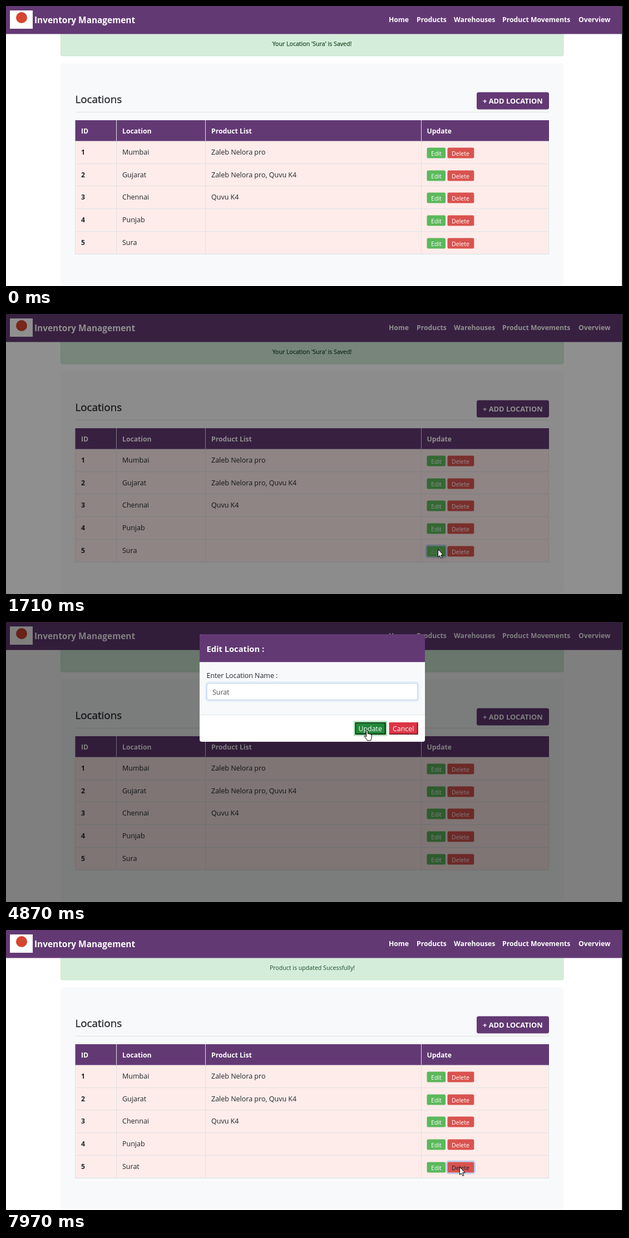
An HTML page that plays this animation: 1109 px wide and 505 px high, repeating every 8 s.

```html
<!DOCTYPE html>
<html lang="en">
<head>
<meta charset="utf-8">
<title>Inventory Management</title>
<style>
  html, body { margin: 0; width: 100%; height: 100%; overflow: hidden; background: #fff; }
  svg { display: block; width: 1109px; height: 505px; }
  text { font: 12.5px "Open Sans", "Noto Sans", sans-serif; fill: #212529; white-space: pre; }
  .bold text, text.bold { font-weight: 700; font-size: 12.2px; }
  .light text, text.light { fill: #fff; }
  .small text, text.small { font-size: 10.6px; }
  .form text { font-size: 12.4px; }
  text.heading { font-size: 18.8px; font-weight: 500; stroke: #212529; stroke-width: .35; }
  .notice text { fill: #1d4a2a; text-anchor: middle; }
  .notice .old { stroke: #1d4a2a; stroke-width: .25; }
  .purple { fill: #633974; }
  .line { fill: none; stroke: #dee2e6; }
  .glow { fill: none; stroke: #007bff; stroke-opacity: .25; stroke-width: 2.7; }

  /* One 8 s clock for everything; 1% is 80 ms. */
  .anim { animation: 8s step-end infinite; }
  .old { animation-name: old; }
  .new { animation-name: new; }
  .edit-text { animation-name: edit-text; }
  .edit-ring { animation-name: edit-ring; }
  .del-text { animation-name: del-text; }
  .del-ring { animation-name: del-ring; }
  .backdrop { animation-name: backdrop; }
  .modal { animation-name: modal; }
  .field-ring { animation-name: field-ring; }
  .typed { animation-name: typed; }
  .caret { animation-name: caret; }
  .update { animation-name: update; }
  .update-ring { animation-name: update-ring; }
  .pointer { animation-name: pointer; }
  .arrow { animation-name: arrow; }
  .beam { animation-name: beam; }
  .hand { animation-name: hand; }

  @keyframes old { 0% { opacity: 1 } 77.375%, 100% { opacity: 0 } }
  @keyframes new { 0% { opacity: 0 } 77.375%, 100% { opacity: 1 } }

  @keyframes edit-text {
    0% { fill: #fff } 12.44% { fill: #212529 } 20.25% { fill: #b4bdb4 }
    22.375%, 100% { fill: #fff }
  }
  @keyframes edit-ring {
    0% { opacity: 0 } 17.25% { opacity: .5 } 18.25% { opacity: 1 }
    32.875% { opacity: .6 } 33.875% { opacity: .3 } 34.875%, 100% { opacity: 0 }
  }
  @keyframes del-text { 0% { fill: #fff } 94.5%, 100% { fill: #212529 } }
  @keyframes del-ring {
    0% { opacity: 0 } 97.75% { opacity: .4 } 98.625% { opacity: .8 } 99.625%, 100% { opacity: 1 }
  }

  @keyframes backdrop {
    0% { opacity: 0 } 20.25% { opacity: .15 } 21.375% { opacity: .44 }
    22.375% { opacity: .5 } 77.375%, 100% { opacity: 0 }
  }
  @keyframes modal {
    0% { opacity: 0; transform: translateY(-42px) }
    22.375% { opacity: .27; transform: translateY(-31px) }
    23.375% { opacity: .62; transform: translateY(-16px) }
    24.375% { opacity: .87; transform: translateY(-5px) }
    25.25% { opacity: .98; transform: translateY(-1px) }
    26.25% { opacity: 1; transform: none }
    77.375%, 100% { opacity: 0; transform: none }
  }
  @keyframes field-ring {
    0% { opacity: 0 } 32.875% { opacity: .3 } 33.875% { opacity: .7 } 34.875% { opacity: 1 }
    59.875% { opacity: .7 } 60.875% { opacity: .3 } 61.875%, 100% { opacity: 0 }
  }
  @keyframes typed { 0% { fill: transparent } 42.5%, 100% { fill: #495057 } }
  @keyframes caret {
    0% { opacity: 0; transform: none }
    32.875% { opacity: 1; transform: none }
    39.625% { opacity: 0; transform: none }
    42.5% { opacity: 1; transform: translateX(5px) }
    49.375% { opacity: 0; transform: translateX(5px) }
    55.625% { opacity: 1; transform: translateX(5px) }
    59.875%, 100% { opacity: 0; transform: translateX(5px) }
  }
  @keyframes update { 0% { fill: #28a745 } 55.625%, 100% { fill: #218838 } }
  @keyframes update-ring {
    0% { opacity: 0 } 59.875% { opacity: .4 } 60.875% { opacity: .8 } 61.875%, 100% { opacity: 1 }
  }

  @keyframes pointer {
    0% { transform: translate(996px, 489px) }
    3.5% { transform: translate(869px, 377px) }
    6.625% { transform: translate(869px, 377px); animation-timing-function: steps(4, jump-both) }
    10.5% { transform: translate(800px, 408px); animation-timing-function: steps(4, jump-end) }
    14.375% { transform: translate(776px, 424px) }
    24.375% { transform: translate(720px, 360px) }
    25.25% { transform: translate(640px, 240px) }
    26.25% { transform: translate(570px, 160px) }
    27.125% { transform: translate(535px, 137px) }
    28.125% { transform: translate(507.5px, 125px) }
    29.125% { transform: translate(500.5px, 126px) }
    30% { transform: translate(495.5px, 127px) }
    31% { transform: translate(492.5px, 127px) }
    49.375% { transform: translate(547px, 170px) }
    50.375% { transform: translate(584px, 204px) }
    53.25% { transform: translate(584px, 204px); animation-timing-function: steps(4, jump-both) }
    57% { transform: translate(649px, 195px) }
    75.5% { transform: translate(650px, 195px) }
    84.25% { transform: translate(730px, 325px) }
    85.1875% { transform: translate(795px, 430px) }
    86.125% { transform: translate(814px, 461px) }
    88.125% { transform: translate(814px, 461px); animation-timing-function: steps(2, jump-both) }
    90% { transform: translate(831px, 487px); animation-timing-function: steps(6, jump-end) }
    95.625%, 100% { transform: translate(815px, 427px) }
  }
  @keyframes arrow {
    0% { opacity: 0 } 2.625% { opacity: 1 } 27.125% { opacity: 0 }
    49.375% { opacity: 1 } 55.625% { opacity: 0 } 84.25%, 100% { opacity: 1 }
  }
  @keyframes beam { 0% { opacity: 0 } 27.125% { opacity: 1 } 49.375%, 100% { opacity: 0 } }
  @keyframes hand { 0% { opacity: 0 } 55.625% { opacity: 1 } 84.25%, 100% { opacity: 0 } }
</style>
</head>
<body>
<svg viewBox="0 0 1109 505" xmlns="http://www.w3.org/2000/svg">
  <defs>
    <g id="row">
      <rect x="124.5" y="243.5" width="851" height="41" fill="#fdecea" stroke="#dee2e6"/>
      <path class="line" d="M198.5 243v41M358.5 243v41M746.5 243v41"/>
      <rect x="756.5" y="255.5" width="33.5" height="19" rx="2.5" fill="#5cb85c"/>
      <rect x="793.5" y="255.5" width="47.8" height="19" rx="2.5" fill="#d9534f"/>
    </g>
    <g id="labels" class="light small">
      <text x="764" y="270">Edit</text>
      <text x="801" y="270">Delete</text>
    </g>
  </defs>

  <!-- page -->
  <rect width="1109" height="505" fill="#fff"/>
  <rect x="98.5" y="40.5" width="903.5" height="49.5" rx="3" fill="#d4edda" stroke="#c3e6cb"/>
  <g class="notice small">
    <text class="anim old" x="550" y="72">Your Location 'Sura' is Saved!</text>
    <text class="anim new" x="550.5" y="72">Product is updated Sucessfully!</text>
  </g>
  <rect class="purple" width="1109" height="50.5"/>
  <rect x="7" y="8" width="41" height="33" fill="#fff"/>
  <circle cx="28" cy="21" r="10" fill="#d6452f"/>
  <g class="bold light">
    <text x="51" y="31" style="font-size:15.4px">Inventory Management</text>
    <text x="688" y="29">Home</text>
    <text x="738" y="29">Products</text>
    <text x="805" y="29">Warehouses</text>
    <text x="892" y="29">Product Movements</text>
    <text x="1029" y="29">Overview</text>
  </g>

  <rect x="98" y="103.5" width="904.5" height="400" rx="5" fill="#f8f9fa"/>
  <text class="heading" x="124.5" y="175">Locations</text>
  <path d="M125 191.5H976" stroke="#000" stroke-opacity=".1"/>
  <rect class="purple" x="846" y="155.5" width="130" height="31" rx="3.5"/>
  <text class="bold light" x="857" y="176" style="font-size:12.85px">+ ADD LOCATION</text>

  <!-- table -->
  <use href="#row"/>
  <use href="#row" y="41"/>
  <use href="#row" y="81"/>
  <use href="#row" y="122"/>
  <use href="#row" y="163"/>
  <use href="#labels"/>
  <use href="#labels" y="41"/>
  <use href="#labels" y="81"/>
  <use href="#labels" y="122"/>
  <g class="small">
    <text class="light anim edit-text" x="764" y="433">Edit</text>
    <text class="light anim del-text" x="801" y="433">Delete</text>
  </g>
  <rect class="glow anim edit-ring" x="755.2" y="417.2" width="36.1" height="21.6" rx="3.5"/>
  <rect class="glow anim del-ring" x="792.2" y="417.2" width="50.4" height="21.6" rx="3.5"/>

  <rect class="purple" x="124.5" y="206" width="851.5" height="37.5"/>
  <path class="line" d="M198.5 206v37M358.5 206v37M746.5 206v37"/>
  <g class="bold light">
    <text x="135" y="230">ID</text>
    <text x="209" y="230">Location</text>
    <text x="369" y="230">Product List</text>
    <text x="756.5" y="230">Update</text>
  </g>
  <g class="bold">
    <text x="135" y="268">1</text>
    <text x="135" y="309">2</text>
    <text x="135" y="349">3</text>
    <text x="135" y="390">4</text>
    <text x="135" y="431">5</text>
  </g>
  <text x="209" y="268">Mumbai</text>
  <text x="209" y="309">Gujarat</text>
  <text x="209" y="349">Chennai</text>
  <text x="209" y="390">Punjab</text>
  <text class="anim old" x="209" y="431">Sura</text>
  <text class="anim new" x="209" y="431">Surat</text>
  <text x="369" y="268">Zaleb Nelora pro</text>
  <text x="369" y="309">Zaleb Nelora pro, Quvu K4</text>
  <text x="369" y="349">Quvu K4</text>

  <rect class="anim backdrop" width="1109" height="505" opacity="0"/>

  <!-- dialog -->
  <g class="anim modal form" opacity="0">
    <rect x="348" y="22" width="405" height="194" rx="4" fill="#fff"/>
    <path class="purple" d="M348 72.5V26a4 4 0 0 1 4-4H749a4 4 0 0 1 4 4V72.5Z"/>
    <rect x="348" y="72.5" width="405" height="95" fill="#f8f9fb"/>
    <path class="line" d="M348 167.5H753"/>
    <text class="light" x="360.5" y="53.5" style="font-size:14.7px;font-weight:700">Edit Location :</text>
    <text x="360.5" y="100.5">Enter Location Name :</text>

    <rect x="361" y="110.5" width="379" height="30" rx="3.5" fill="#fff" stroke="#ced4da"/>
    <g class="anim field-ring">
      <rect x="361" y="110.5" width="379" height="30" rx="3.5" fill="none" stroke="#80bdff"/>
      <rect class="glow" x="359.2" y="108.7" width="382.6" height="33.6" rx="5"/>
    </g>
    <text x="371" y="131" style="fill:#495057">Sura<tspan class="anim typed">t</tspan></text>
    <path class="anim caret" d="M396.5 117v17" stroke="#222"/>

    <rect class="anim update" x="627.5" y="181" width="55" height="22" fill="#28a745"/>
    <path d="M628.5 202.2H681.7V181.5" fill="none" stroke="#11481e" stroke-width="1.6"/>
    <g class="anim update-ring" fill="none">
      <rect x="626.2" y="179.7" width="57.6" height="24.6" stroke="#28a745" stroke-opacity=".45" stroke-width="2.7"/>
      <rect x="628.3" y="181.8" width="53.4" height="20.4" rx="1" stroke="#0b1a0e" stroke-width="1.6"/>
    </g>
    <rect x="688.5" y="181" width="52" height="22" fill="#dc3545"/>
    <path d="M689.5 202.2H739.7V181.5" fill="none" stroke="#5f141c" stroke-width="1.6"/>
    <text class="light" x="633.5" y="197">Update</text>
    <text class="light" x="695" y="197">Cancel</text>
  </g>

  <!-- window edge -->
  <rect x="1107" width="2" height="505" fill="#3a3a3a"/>
  <rect x="1108" width="1" height="505" fill="#0a0a0a"/>

  <!-- mouse pointer -->
  <g class="anim pointer">
    <path class="anim arrow" d="M.5.5V14.4L3.6 11.6 5.8 16.4 7.9 15.5 5.8 10.7H10Z" fill="#fff" stroke="#000"/>
    <path class="anim beam" d="M-3-6.5h2l1 .8 1-.8h2M0-6V6M-3 6.5h2l1-.8 1 .8h2" fill="none" stroke="#000"/>
    <path class="anim hand" d="M-1.5 11V1.9a1.4 1.4 0 0 1 2.8 0V7a1.4 1.4 0 0 1 2.6.4 1.3 1.3 0 0 1 2.4.6 1.2 1.2 0 0 1 1.9 1V13c0 2.4-1.3 3-1.5 5.8H.2C-.2 16.2-4 13.4-4.7 11.4c-.6-1.8 1.5-2.2 3.2.8Z" fill="#fff" stroke="#000"/>
  </g>
</svg>
</body>
</html>
```
